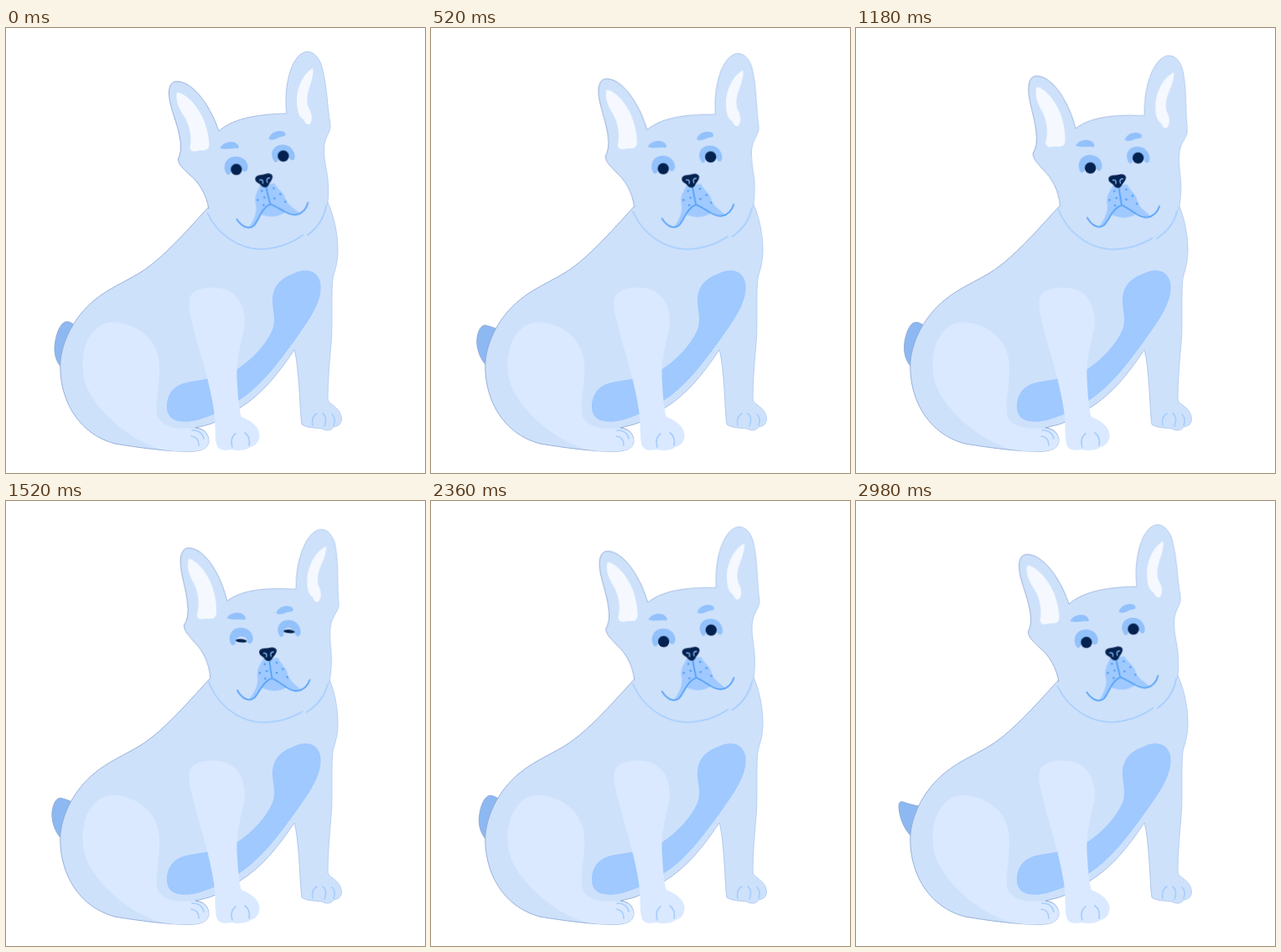
An HTML page for the animation above (3000 ms loop, 500 by 531 pixels).

```html
<!DOCTYPE html>
<html lang="en">
<head>
<meta charset="utf-8">
<title>Sitting dog</title>
<style>
  html, body { margin: 0; width: 100%; height: 100%; overflow: hidden; background: #fff; }
  svg { display: block; width: 100vw; height: 100vh; }

  .base { fill: #cee1fb; }
  .light { fill: #dae9ff; }
  .spot { fill: #9fc9ff; }
  .patch { fill: #92c1fb; }
  .ear { fill: #f5f9ff; }
  .dark { fill: #04224f; }
  .edge { stroke: url(#rim); stroke-width: .9; }
  .line { fill: none; stroke: #a6cefd; stroke-width: 1.7; stroke-linecap: round; }
  .mouth { fill: none; stroke: #529ff6; stroke-width: 1.7; stroke-linecap: round; }
  .dots { fill: #529ff6; }

  .head { transform-origin: 302px 235px; animation: tilt 3s infinite; }
  .pupil { transform-box: fill-box; transform-origin: center; animation: blink 3s linear infinite; }
  .tail { fill: #8db8f1; animation: wag 3s ease-in-out infinite; }

  @keyframes tilt {
    0% { animation-timing-function: cubic-bezier(.33, .4, .67, .73); }
    50% { transform: rotate(5deg); animation-timing-function: cubic-bezier(.33, .27, .67, .6); }
  }

  @keyframes blink {
    0%, 43.4%, 56.6%, 100% { transform: scaleY(1); }
    50% { transform: scaleY(.24); }
  }

  /* The wag is cut off mid-swing when the loop restarts. */
  @keyframes wag {
    0%, .99%, 14.19%, 27.39%, 40.59%, 53.79%, 66.99%, 80.19%, 93.39% {
      d: path("M90 362 C84 356 78 350 72 350.5 C64 351 58 370 58 383 C58 392 61 399 66 405 L95 400 Z");
    }
    7.59%, 20.79%, 33.99%, 47.19%, 60.39%, 73.59%, 86.79%, 99.99%, 100% {
      d: path("M90 366 C78 365 65 363 57 359.5 C52 357 50.5 361 51 366 C52 378 57 391 66 400 L95 400 Z");
    }
  }
</style>
</head>
<body>
<svg viewBox="0 0 500 531" preserveAspectRatio="none">
  <linearGradient id="rim" gradientUnits="userSpaceOnUse" x1="50" y1="0" x2="400" y2="0">
    <stop offset=".5" stop-color="#8ea8d6"/>
    <stop offset="1" stop-color="#b4cdf4"/>
  </linearGradient>

  <path class="tail edge" d="M90 362 C84 356 78 350 72 350.5 C64 351 58 370 58 383 C58 392 61 399 66 405 L95 400 Z"/>

  <g class="body">
    <path class="base edge" d="M379 198 C388 214 396 238 396 265 C396 286 390 292 389.500 304
      C388 325 390 355 388 376 C386 400 384 420 384 443 C385 450 398 451 400.500 465
      C401 472 397 475 391 476 C388 481 382 481 377 478 C368 477 358 477 353 473
      C351 460 351 435 348 408 C347 398 346 391 344 384 C326 411 306 437 278 454
      L250 470 C242 474 233 475 226 477 C238 478 242 486 242 493 C241 502 233 505 218 505.500
      C190 505 160 501 130 496 C104 489 85 472 74 448 C66 430 64 412 65 397
      C68 370 83 344 104 326 C126 307 152 300 174 282 C198 263 221 236 246 209"/>
    <ellipse class="base" cx="311" cy="214" rx="64" ry="46"/>
    <path class="spot" d="M343 293 C356 286 371 288 375 303 C379 325 362 348 345 372
      C325 400 302 430 277 445 C260 457 242 464 228 468 C210 472 194 470 192 455
      C191 437 200 425 220 422 C240 419 260 416 276 407 C293 396 310 378 318 360
      C323 345 317 335 318 322 C320 305 330 298 343 293 Z"/>
    <path class="light" d="M127 351 C157 352 182 372 183 402 C184 425 178 445 180 460
      C182 472 196 478 212 478 C229 477 242 481 242 493 C241 502 233 505 218 505.500
      C205 506 192 504 182 502 C145 489 108 458 95 425 C84 388 100 352 127 351 Z"/>
    <path class="light" d="M219 323 C221 312 240 307 258 311 C279 315 288 339 284 359
      C278 385 274 402 276 425 C277 445 279 460 281 464 C291 468 302 475 302.500 485
      C303 493 298 499 292 500 C287 504 277 505 269 503 C259 505 252 503 251 496
      C249 486 250 475 249 463 C246 437 238 408 228 374 C222 350 217 336 219 323 Z"/>
    <path class="line" d="M222 480 Q234 480 236 490 M221 487 Q230 488 230 498
      M270 500 Q267 489 274 484 M290 498 Q292 488 285 483
      M366 474 Q364 464 371 460 M380 475 Q384 465 378 460 M391 474 Q394 466 389 461"/>
  </g>

  <g class="head">
    <path class="base edge" d="M242 216 C239 198 230 184 219 175 C214 170 205 163 205.500 156
      C210 147 209 137 206 124 C202 107 194 91 194.500 76 C195 67 199 63 206 64
      C218 65 231 78 240 93 C248 106 251 115 254 123 C270 109 295 103 335 102
      C332 80 336 50 347 36 C356 24 369 26 376 43 C383 65 383 93 387 115
      C388 122 382 129 380 138 C378 152 382 165 384 180 C385 195 385 204 383 212"/>
    <path class="line" d="M240.500 221 C252 246 278 264 305 264 C325 263 342 256 354.500 247
      M360 247 C372 238 380 225 382 212"/>

    <path class="ear" d="M204 77 C211 77 221 85 229 97 C238 110 242 127 242.500 139
      C242 147 236 146 231 146 C225 148 220 148 219.500 142 C222 132 220 118 213 106
      C206 96 202 86 204 77 Z"/>
    <path class="ear" d="M366 48 C356 54 349 66 347 83 C347 98 349 106 355 109
      C357 113 360 117 363 114 C367 108 364 100 361 95 C357 85 361 74 364 65
      C366 58 367 52 366 48 Z"/>

    <g class="face" transform="translate(.4 -.7)">
      <path class="patch" d="M255 144 C258 138 266 135 272 137 C277 139 279 144 276 144.500
        C269 143 262 147 255 144 Z"/>
      <path class="patch" d="M313 133 C315 126 323 122 330 124 C334 126 334 129 331 130
        C325 130 319 137 313 133 Z"/>
      <path class="patch" d="M264 176 C257 169 260 154 274 154 C286 154 291 166 287 171
        C284 174 281 171 281 167 C277 163 270 164 268 169 C269 173 267 176 264 176 Z"/>
      <path class="patch" d="M321 161 C313 153 317 140 330 140 C342 140 347 154 343 158
        C340 160 337 156 336 152 C332 148 326 148 324 153 C325 158 324 161 321 161 Z"/>
      <circle class="pupil dark" cx="274.500" cy="169.500" r="6.700"/>
      <circle class="pupil dark" cx="330.500" cy="153.500" r="6.700"/>

      <path class="spot" d="M303 188 C299 197 295 202 298 213 C299 223 294 232 290 238
        Q294 240 297 236 L304 223 C314 228 328 226 334 219 Q342 225 350 222
        C344 216 335 212 333 204 C331 196 324 194 320 186 Z"/>
      <path class="mouth" d="M275 229 C281 238 290 242 296 236 C302 228 305 215 315 211
        C328 216 337 225 346 223.500 C353 222 358 217 360 209 M310 190 Q312 200 315 211"/>
      <g class="dots">
        <circle cx="305" cy="195" r="1.300"/>
        <circle cx="300" cy="206" r="1.300"/>
        <circle cx="308" cy="203" r="1.300"/>
        <circle cx="307" cy="212" r="1.300"/>
        <circle cx="319" cy="192" r="1.300"/>
        <circle cx="320" cy="204" r="1.300"/>
        <circle cx="327" cy="199" r="1.300"/>
        <circle cx="333" cy="208" r="1.300"/>
      </g>
      <path class="dark" d="M297 181 C297 176 303 176.500 307 175.500 C311 174 316 173 317.500 177
        C318.500 181 314 185 312.500 189 C310 192 306 191 304 188.500 C302 186 297 185 297 181 Z"/>
      <path fill="none" stroke="#92c1fb" stroke-width="1.300" stroke-linecap="round"
        d="M302.500 182 Q307 181 306 186 M314 179.500 Q309.500 180 311.500 185"/>
    </g>
  </g>
</svg>
</body>
</html>
```
